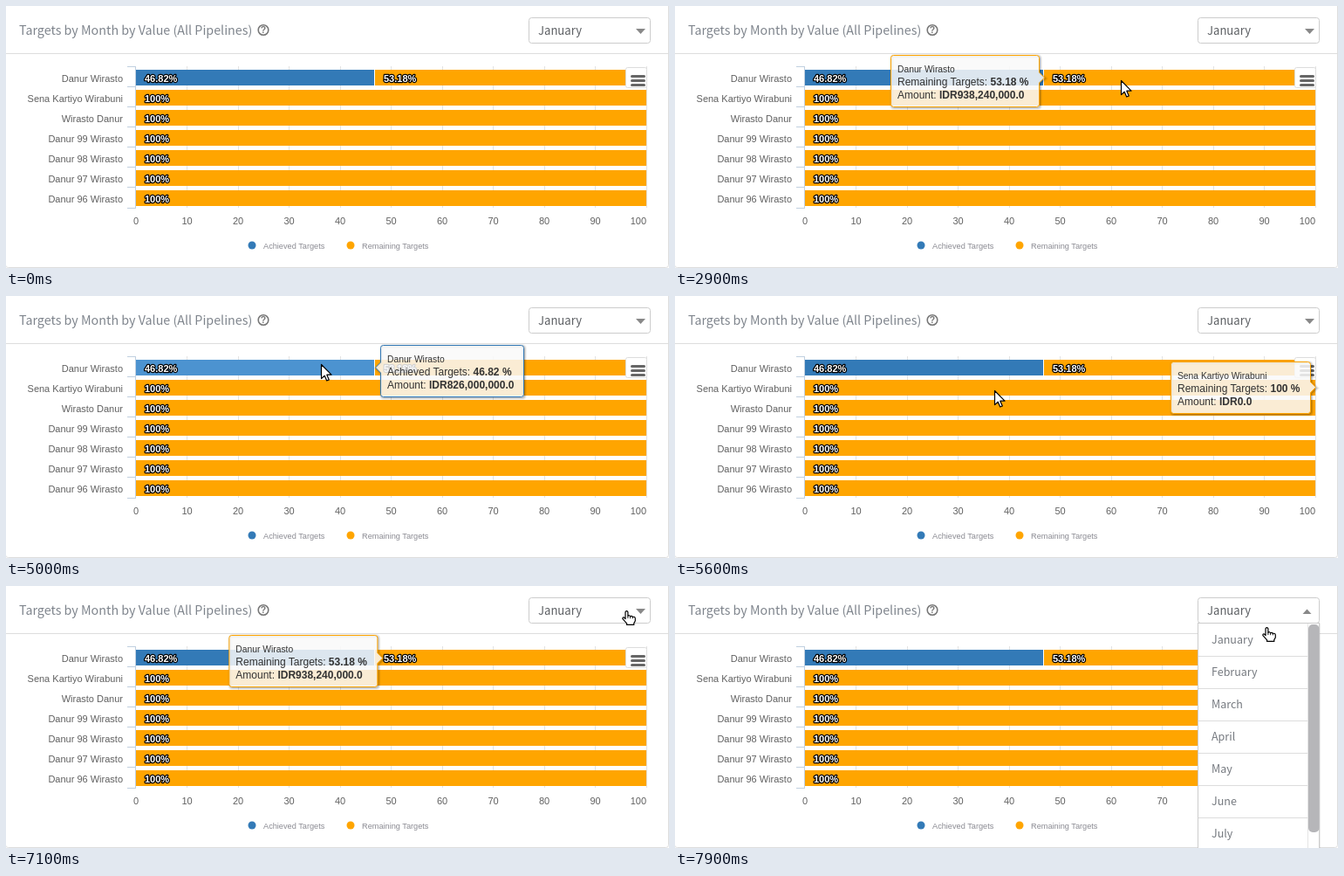
Animation, 760 px wide and 300 px high, one loop 8000 ms. Source, as an HTML page:

```html
<!DOCTYPE html>
<html lang="en">
<head>
<meta charset="utf-8">
<title>Targets by month</title>
<style>
  html, body { margin: 0; width: 100%; height: 100%; overflow: hidden; background: #fff; }
  svg { display: block; }
  text { font-family: "Liberation Sans", Arial, sans-serif; font-size: 11px; fill: #606060; white-space: pre; }
  .ui { font-family: "Noto Sans CJK JP", "Noto Sans CJK SC", "Noto Sans CJK", "Noto Sans", sans-serif; }
  .title { font-size: 14.3px; fill: #7f858d; }
  .field { font-size: 13.1px; fill: #5c5f63; }
  .option { font-size: 12.5px; font-weight: 300; fill: #75797f; }
  .value { font-weight: bold; fill: #fff; stroke: #000; stroke-width: 2.4px; stroke-linejoin: round; paint-order: stroke; }
  .legend { font-size: 9.2px; fill: #8a8a92; }
  .head { font-size: 10.3px; fill: #333; }
  .line { font-size: 12px; fill: #333; }
  .bold { font-weight: bold; }
  .end { text-anchor: end; }
  .mid { text-anchor: middle; }
</style>
</head>
<body>
<svg id="stage" width="760" height="300" viewBox="0 0 760 300">
  <rect width="760" height="300" fill="#fff"/>
  <rect x="-.5" y="-6" width="760" height="305.5" rx="3" fill="none" stroke="#ddd"/>
  <path d="M0 54.5H759" stroke="#ddd"/>
  <text class="ui title" x="15" y="33">Targets by Month by Value (All Pipelines)</text>
  <circle cx="295" cy="27.5" r="5.8" fill="none" stroke="#777" stroke-width="1.6"/>
  <text class="bold mid" x="295" y="31.3" style="font-size:10.5px;fill:#777">?</text>

  <rect x="599.5" y="13.5" width="139" height="29" rx="3" fill="#fff" stroke="#ccc"/>
  <text class="ui field" x="610" y="33">January</text>
  <path id="caret" fill="#888"/>

  <g id="chart"></g>

  <g id="menu">
    <rect x="710.5" y="70.5" width="24" height="23" rx="2" fill="#fff" stroke="#ddd"/>
    <path d="M717.5 80.5H731.5M717.5 85.5H731.5M717.5 90.5H731.5" stroke="#666" stroke-width="3" stroke-linecap="round"/>
  </g>

  <g id="tip">
    <g fill="none" stroke="#000" transform="translate(1 1)">
      <path class="shape" stroke-width="5" stroke-opacity=".05"/>
      <path class="shape" stroke-width="3" stroke-opacity=".1"/>
      <path class="shape" stroke-width="1" stroke-opacity=".15"/>
    </g>
    <path class="shape" id="box" fill="#f9f9f9" fill-opacity=".85"/>
    <g id="words"></g>
  </g>

  <g id="list"></g>

  <g id="arrow" fill="#fff" stroke="#000" stroke-linejoin="round">
    <path d="M.5 .5V16.6L4.2 13.2L6.7 19L9.3 17.9L6.8 12.2H12Z" stroke-width="1.2"/>
  </g>
  <g id="hand" fill="#fff" stroke="#000" stroke-linejoin="round">
    <path stroke-width="1.2" d="M4 1.8Q5.4 -.4 6.9 1.8V6.2Q8.6 5 9.6 6.8Q11.2 5.8 12.3 7.4Q15 6.8 15.3 9V12L13.8 14.6V16.4H5.6V14.9L.9 9.6Q.6 7.4 2.6 8.1L4 9.6Z"/>
    <path fill="none" stroke-width=".9" d="M6.9 6V9M9.6 6.8V9.2M12.3 7.4V9.4"/>
  </g>
</svg>
<script>
const $ = id => document.getElementById(id);
const BLUE = '#337ab7', BLUE_HOVER = '#4c93d0', ORANGE = '#ffa500';
const LOOP = 8000, STEP = 100;
const people = ['Danur Wirasto', 'Sena Kartiyo Wirabuni', 'Wirasto Danur',
  'Danur 99 Wirasto', 'Danur 98 Wirasto', 'Danur 97 Wirasto', 'Danur 96 Wirasto'];
const months = ['January', 'February', 'March', 'April', 'May', 'June', 'July'];

const text = (cls, x, y, s) => `<text class="${cls}" x="${x}" y="${y}">${s}</text>`;
const rect = (x, y, w, h, fill, more = '') =>
  `<rect x="${x}" y="${y}" width="${w}" height="${h}" fill="${fill}" ${more}/>`;
const line = (d, color) => `<path d="${d}" stroke="${color}" fill="none"/>`;

function drawChart() {
  let grid = '', ticks = 'M148.5 69V232', bars = '', labels = '';
  for (let i = 0; i <= 10; i++) {
    const x = 149 + 58.5 * i;
    if (i) grid += `M${Math.floor(x) + .5} 69V231`;
    labels += i < 10 ? text('mid', x, 250, i * 10) : text('end', 734, 250, 100);
  }
  for (let i = 0; i <= 7; i++) ticks += `M139 ${Math.floor(69 + 23.15 * i) + .5}H149`;
  people.forEach((name, i) => {
    const y = 73 + 23 * i;
    if (i) bars += rect(149, y, 585, 18, ORANGE);
    else bars += rect(149, y, 273, 18, BLUE, 'id="achieved"') + rect(423, y, 311, 18, ORANGE);
    labels += text('end', 134, y + 14, name) + text('value', 159, y + 14, i ? '100%' : '46.82%');
  });
  labels += text('value', 433, 87, '53.18%');
  [[282, BLUE, 'Achieved Targets'], [395, ORANGE, 'Remaining Targets']].forEach(([x, color, s]) => {
    labels += `<circle cx="${x}" cy="274" r="4.5" fill="${color}"/>` + text('legend', x + 13, 278, s);
  });
  $('chart').innerHTML = line(grid, '#e2e2e2') + line(ticks, '#c0d0e0') + bars + labels;
}

function drawList() {
  let s = rect(599, 43, 141, 270, '#000', 'opacity=".07"') +
    rect(599.5, 42.5, 139, 270, '#fff', 'stroke="#ccc"');
  months.forEach((m, i) => {
    s += text('ui option', 615, 66 + 37 * i, m) + line(`M600 ${80.5 + 37 * i}H726`, '#ddd');
  });
  $('list').innerHTML = s + line('M725.5 43V300', '#e4e4e4') + rect(726, 44, 12.5, 238, '#b6b6b9', 'rx="5"');
}

// Tooltip targets: start time, box, anchor point, content
const remaining = { x: 247.5, y: 56.5, w: 170, ax: 423.5, ay: 82, color: ORANGE,
  who: 0, label: 'Remaining', pct: '53.18', amount: '938,240,000.0' };
const tips = [
  { ...remaining, at: 2100 },
  { at: 3200, x: 429.5, y: 56.5, w: 164, ax: 423.5, ay: 82, color: BLUE,
    who: 0, label: 'Achieved', pct: '46.82', amount: '826,000,000.0' },
  { at: 5100, x: 568.5, y: 75.5, w: 160, ax: 734.5, ay: 104.5, color: ORANGE,
    who: 1, label: 'Remaining', pct: '100', amount: '0.0' },
  { ...remaining, at: 6800 }
];

// Pointer poses: time, x, y, shape
const moves = [
  [1200, 648, -12, 'arrow'], [1300, 653, 0, 'arrow'], [1400, 658, 12, 'hand'],
  [1600, 645, 24, 'hand'], [1700, 612, 43, 'arrow'], [1800, 594, 53, 'arrow'],
  [2000, 572, 65, 'arrow'], [2100, 530, 80, 'arrow'], [2200, 511, 85, 'arrow'],
  [3000, 490, 84, 'arrow'], [3100, 445, 82, 'arrow'], [3200, 405, 80, 'arrow'],
  [3300, 376, 78, 'arrow'], [3400, 361, 78, 'arrow'],
  [5100, 362, 97, 'arrow'], [5200, 365, 105, 'arrow'], [5300, 366, 108, 'arrow'],
  [6600, 380, 106, 'arrow'], [6700, 430, 97, 'arrow'], [6800, 500, 82, 'arrow'],
  [6900, 590, 61, 'arrow'], [7000, 670, 38, 'hand'], [7100, 706, 28, 'hand'],
  [7700, 700, 32, 'hand'], [7800, 682, 42, 'hand'], [7900, 673, 47, 'hand']
];

// Rounded box with a 6px pointer on the side facing the anchor
function callout(x, y, w, ax, ay) {
  const h = 59, r = 3, R = x + w, B = y + h;
  const right = ax > R ? `V${ay - 6}L${R + 6} ${ay}L${R} ${ay + 6}` : '';
  const left = ax < x ? `V${ay + 6}L${x - 6} ${ay}L${x} ${ay - 6}` : '';
  return `M${x + r} ${y}H${R - r}Q${R} ${y} ${R} ${y + r}${right}V${B - r}Q${R} ${B} ${R - r} ${B}` +
    `H${x + r}Q${x} ${B} ${x} ${B - r}${left}V${y + r}Q${x} ${y} ${x + r} ${y}Z`;
}

const shapes = document.querySelectorAll('.shape');
let shown = null;

function drawTip(t) {
  const i = tips.findLastIndex(p => p.at <= t);
  const opacity = t < 7400 ? 1 : t < 7500 ? .7 : t < 7600 ? .25 : 0;
  $('tip').setAttribute('opacity', i < 0 ? 0 : opacity);
  if (i < 0) return;
  const to = tips[i], from = tips[i - 1] || to;
  const left = Math.pow(2 / 3, 3 * (t - to.at) / STEP);
  const ease = k => {
    const d = (from[k] - to[k]) * left;
    return to[k] + (Math.abs(d) < .5 ? 0 : d);
  };
  const x = ease('x'), y = ease('y');
  const d = callout(x, y, to.w, ease('ax'), ease('ay'));
  shapes.forEach(p => p.setAttribute('d', d));
  $('box').setAttribute('stroke', to.color);
  $('words').setAttribute('transform', `translate(${x + 7.5} ${y - .5})`);
  if (shown !== to) {
    const bold = s => `<tspan class="bold">${s}</tspan>`;
    $('words').innerHTML = text('head', 0, 20, people[to.who]) +
      text('line', 0, 35, `${to.label} Targets: ${bold(to.pct + ' %')}`) +
      text('line', 0, 50, `Amount: ${bold('IDR' + to.amount)}`);
    shown = to;
  }
}

function drawPointer(t) {
  const pose = moves.findLast(m => m[0] <= t);
  for (const kind of ['arrow', 'hand']) {
    const on = pose && pose[3] === kind;
    $(kind).setAttribute('visibility', on ? 'visible' : 'hidden');
    if (on) $(kind).setAttribute('transform', `translate(${pose[1]} ${pose[2]})`);
  }
}

function render(t) {
  const open = t >= 7600;
  $('achieved').setAttribute('fill', t >= 3200 && t < 5100 ? BLUE_HOVER : BLUE);
  $('caret').setAttribute('d', open ? 'M719.5 32H729.5L724.5 26.5Z' : 'M722 26H733L727.5 32Z');
  $('list').setAttribute('visibility', open ? 'visible' : 'hidden');
  drawTip(t);
  drawPointer(t);
}

drawChart();
drawList();
const start = performance.now();
function tick() {
  const t = (performance.now() - start) % LOOP;
  render(Math.floor(t / STEP) * STEP);
  requestAnimationFrame(tick);
}
tick();
</script>
</body>
</html>
```
